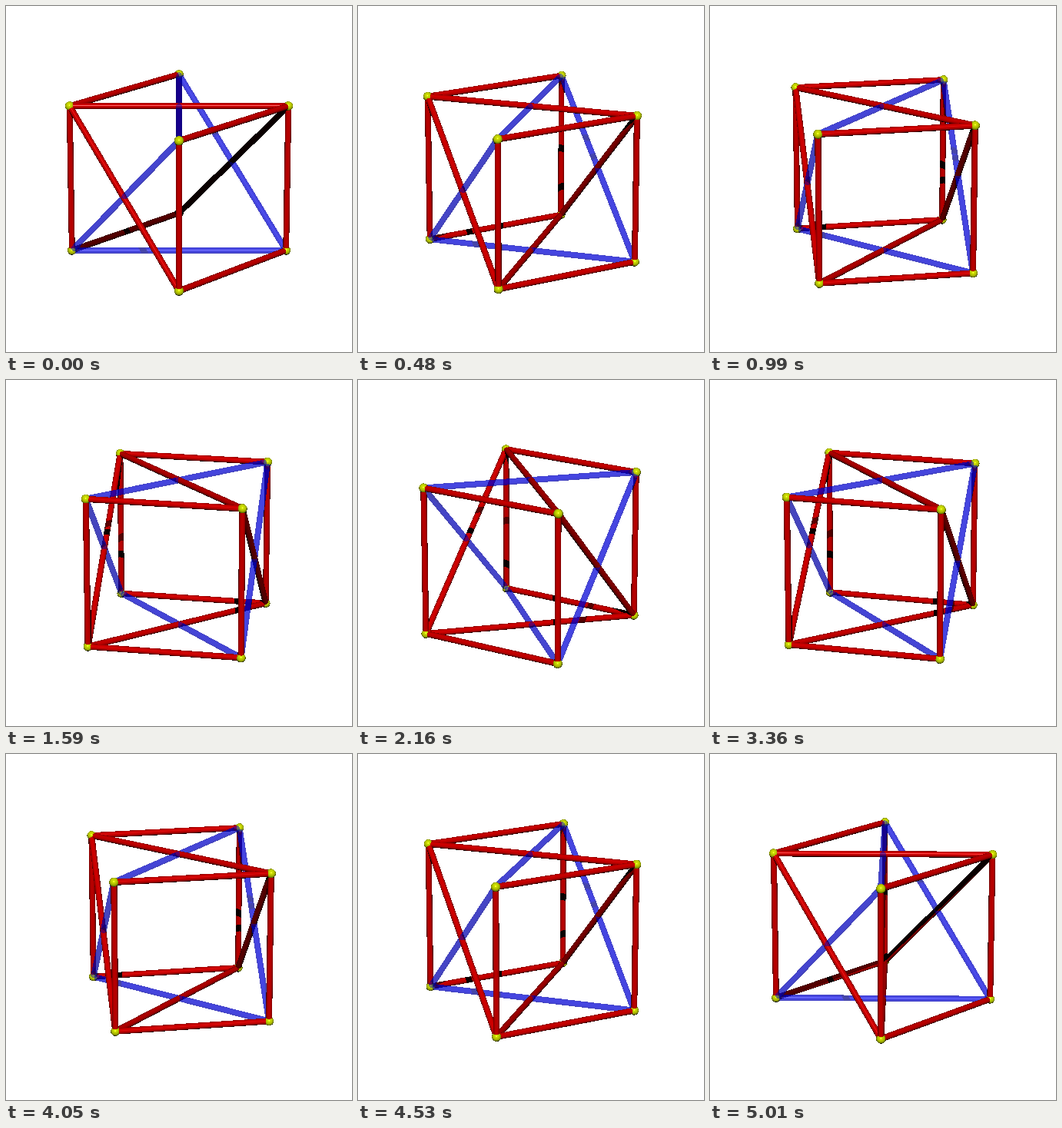
An HTML page with a canvas that plays this animation: 450 by 450 pixels, repeating every 5040 ms.

```html
<!DOCTYPE html>
<html>
<head>
<meta charset="utf-8">
<style>
html, body { margin: 0; width: 100%; height: 100%; overflow: hidden; background: #fff; }
canvas { display: block; width: 450px; height: 450px; }
</style>
</head>
<body>
<canvas id="stage" width="450" height="450"></canvas>
<script>
const SIZE = 450, MID = SIZE / 2;
const STEP = 30, STEPS = 168, HALF = STEPS / 2;
const DIST = 30, FOCAL = 2985;
const TUBE_R = 0.04, BALL_R = 0.06;
const RAD = Math.PI / 180, PITCH = Math.asin(1 / 3);

// A clear tube is crossed twice by each ray: CLEAR is what one wall lets through.
const CLEAR = 0.52;
const RED = { rgb: [208, 0, 0], glow: 0.05, through: 0 };
const YELLOW = { rgb: [208, 226, 0], glow: 0.05, through: 0 };
const BLUE = { rgb: [0, 0, 228], glow: 0.6, through: CLEAR };

// Corners 0-3 are the top square (front, right, back, left), 4-7 lie below them.
const RED_EDGES = [[3, 2], [0, 1], [3, 1], [3, 7], [0, 4], [1, 5], [2, 6], [7, 6], [4, 5], [3, 4], [1, 6], [6, 4]];
const BLUE_EDGES = [[0, 2], [0, 7], [7, 5], [2, 5]];

// The light is fixed to the camera, a little above the view axis.
const tilt = Math.atan(Math.SQRT1_2) - PITCH;
const LY = Math.sin(tilt), LZ = Math.cos(tilt);
const HY = Math.sin(tilt / 2), HZ = Math.cos(tilt / 2);

const stage = document.getElementById('stage').getContext('2d');
const depth = new Float32Array(SIZE * SIZE);
let pix, casters = [];

function corners(turn) {
  const out = [], c = Math.cos(PITCH), s = Math.sin(PITCH);
  for (const y of [1, -1]) {
    for (let i = 0; i < 4; i++) {
      const a = turn + i * Math.PI / 2;
      const x = Math.SQRT2 * Math.sin(a), z = Math.SQRT2 * Math.cos(a);
      out.push([x, y * c - z * s, z * c + y * s]);
    }
  }
  return out;
}

function project(p) {
  const k = FOCAL / (DIST - p[2]);
  return [MID + p[0] * k, MID - p[1] * k];
}

// Coordinates across the light beam, and height towards the light.
const across = p => p[1] * LZ - p[2] * LY;
const along = p => p[1] * LY + p[2] * LZ;

function makeCaster(a, b, r, look) {
  const u = a[0], v = across(a), h = along(a);
  const du = b[0] - u, dv = across(b) - v, dh = along(b) - h;
  return { u, v, h, du, dv, dh, inv: 1 / (du * du + dv * dv + 1e-9), r2: r * r, pass: look.through ** 2 };
}

function makeTube(a, b, look) {
  const d = [b[0] - a[0], b[1] - a[1], b[2] - a[2]];
  const len = Math.hypot(...d);
  return { a, b, len, dir: d.map(n => n / len), look, z: a[2] + b[2], caster: makeCaster(a, b, TUBE_R, look) };
}

function lightAt(x, y, z, own) {
  const v = y * LZ - z * LY, h = y * LY + z * LZ + 0.01;
  let light = 1;
  for (const c of casters) {
    if (c === own) continue;
    const pu = x - c.u, pv = v - c.v;
    let k = (pu * c.du + pv * c.dv) * c.inv;
    k = k < 0 ? 0 : k > 1 ? 1 : k;
    const eu = pu - k * c.du, ev = pv - k * c.dv;
    if (eu * eu + ev * ev < c.r2 && c.h + k * c.dh > h) {
      light *= c.pass;
      if (!light) return 0;
    }
  }
  return light;
}

function paint(i, s, rx, ry, ny, nz, item, gain = 1) {
  const { rgb, glow, through } = item.look;
  const nl = ny * LY + nz * LZ;
  const light = nl > 0 ? gain * lightAt(s * rx, s * ry, DIST - s, item.caster) : 0;
  const shade = glow + (light ? (1 - glow) * Math.pow(nl * light, 0.65) : 0);
  const nh = ny * HY + nz * HZ;
  const shine = light && nh > 0.9 ? 105 * light * Math.pow(nh, 160) : 0;
  if (!through) depth[i] = s;
  for (let c = 0; c < 3; c++) {
    const value = rgb[c] * shade + shine;
    pix[i * 4 + c] = pix[i * 4 + c] * through + value * (1 - through);
  }
}

function drawTube(t) {
  const [ux, uy, uz] = t.dir, [ax, ay, az] = t.a;
  const [x0, y0] = project(t.a), [x1, y1] = project(t.b);
  const pad = 6, dx = x1 - x0, dy = y1 - y0;
  const left = Math.floor(Math.min(x0, x1) - pad), right = Math.ceil(Math.max(x0, x1) + pad);
  const top = Math.floor(Math.min(y0, y1) - pad), bottom = Math.ceil(Math.max(y0, y1) + pad);
  const wz = DIST - az;
  const wu = -ax * ux - ay * uy + wz * uz;
  const px = -ax - wu * ux, py = -ay - wu * uy, pz = wz - wu * uz;
  const c = px * px + py * py + pz * pz - TUBE_R * TUBE_R;
  for (let y = top; y <= bottom; y++) {
    let from = left, to = right;
    if (Math.abs(dy) > 0.5) {
      const mid = x0 + (y - y0) * dx / dy, reach = pad * Math.hypot(dx, dy) / Math.abs(dy);
      from = Math.max(from, Math.floor(mid - reach));
      to = Math.min(to, Math.ceil(mid + reach));
    }
    const ry = (MID - y - 0.5) / FOCAL;
    for (let x = from; x <= to; x++) {
      const rx = (x + 0.5 - MID) / FOCAL;
      const ru = rx * ux + ry * uy - uz;
      const qx = rx - ru * ux, qy = ry - ru * uy, qz = -1 - ru * uz;
      const a = qx * qx + qy * qy + qz * qz;
      const b = qx * px + qy * py + qz * pz;
      const disc = b * b - a * c;
      if (disc <= 0) continue;
      const root = Math.sqrt(disc), i = y * SIZE + x;
      // side 1 is the far wall seen from inside, side -1 the near wall
      const wall = (side, gain) => {
        const s = (-b + side * root) / a, k = wu + s * ru;
        if (k < 0 || k > t.len || s >= depth[i]) return;
        const n = -side / TUBE_R;
        paint(i, s, rx, ry, (py + s * qy) * n, (pz + s * qz) * n, t, gain);
      };
      if (t.look.through) wall(1, CLEAR);
      wall(-1, 1);
    }
  }
}

function drawBall(ball) {
  const [bx, by, bz] = ball.p, [cx, cy] = project(ball.p);
  const reach = 8, wz = DIST - bz;
  const c = bx * bx + by * by + wz * wz - BALL_R * BALL_R;
  for (let y = Math.floor(cy - reach); y <= cy + reach; y++) {
    const ry = (MID - y - 0.5) / FOCAL;
    for (let x = Math.floor(cx - reach); x <= cx + reach; x++) {
      const rx = (x + 0.5 - MID) / FOCAL;
      const a = rx * rx + ry * ry + 1, b = -rx * bx - ry * by - wz;
      const disc = b * b - a * c;
      if (disc <= 0) continue;
      const s = (-b - Math.sqrt(disc)) / a, i = y * SIZE + x;
      if (s < depth[i]) paint(i, s, rx, ry, (s * ry - by) / BALL_R, (wz - s) / BALL_R, ball);
    }
  }
}

function render(step) {
  const pts = corners(-step * 90 / 85 * RAD);
  const tubes = (edges, look) => edges.map(([a, b]) => makeTube(pts[a], pts[b], look));
  const reds = tubes(RED_EDGES, RED);
  const blues = tubes(BLUE_EDGES, BLUE).sort((a, b) => a.z - b.z);
  const balls = pts.map(p => ({ p, look: YELLOW, caster: makeCaster(p, p, BALL_R, YELLOW) }));
  casters = [...reds, ...blues, ...balls].map(item => item.caster);
  const image = stage.createImageData(SIZE, SIZE);
  pix = image.data;
  pix.fill(255);
  depth.fill(Infinity);
  balls.forEach(drawBall);
  reds.forEach(drawTube);
  blues.forEach(drawTube);
  return image;
}

const cache = [];
let shown = -1;

// The cube swings a quarter turn and back.
function tick() {
  const n = Math.floor(performance.now() / STEP) % STEPS;
  const step = n <= HALF ? n : STEPS - n;
  if (step !== shown) {
    cache[step] = cache[step] || render(step);
    stage.putImageData(cache[step], 0, 0);
    shown = step;
  }
  requestAnimationFrame(tick);
}
tick();
</script>
</body>
</html>
```
